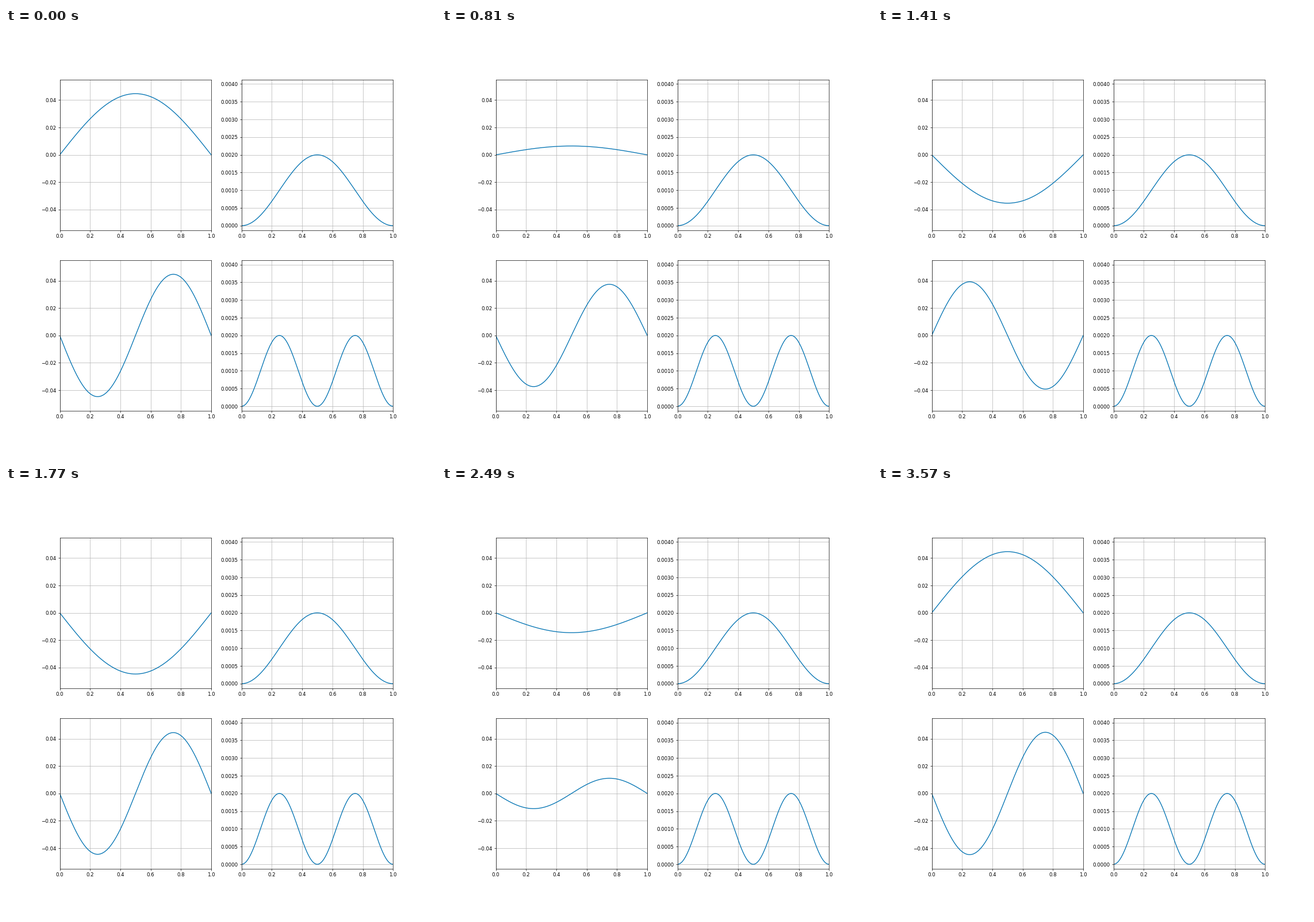
Recreate the animation shown at these times as a matplotlib script. Size 748 by 748 pixels, loop 3600 ms.

```python
import numpy as np
import matplotlib.pyplot as plt
from matplotlib.animation import FuncAnimation

SIZE = 748
INCHES = 12
FRAMES = 120
INTERVAL = 30
POINTS = 1000
LINE_COLOR = "#0072B2"

plt.rcParams["font.family"] = "DejaVu Sans"

x = np.linspace(0, 1, POINTS)
times = np.linspace(0, 2 * np.pi, FRAMES)
amplitude = np.sqrt(2 / POINTS)

# The two lowest states of a particle in a box; energy grows as n squared.
states = [
    (1, amplitude * np.sin(np.pi * x)),
    (4, -amplitude * np.sin(2 * np.pi * x)),
]


def setup(ax, ylim):
    ax.set_xlim(0, 1)
    ax.set_ylim(*ylim)
    ax.grid(True)


fig, axes = plt.subplots(2, 2, figsize=(INCHES, INCHES), dpi=SIZE / INCHES)
fig.subplots_adjust(left=0.125, right=0.9, bottom=0.11, top=0.88,
                    wspace=0.2, hspace=0.2)

waves = []
for (wave_ax, density_ax), (_, psi) in zip(axes, states):
    setup(wave_ax, (-0.055, 0.055))
    setup(density_ax, (-0.000125, 0.004125))
    waves += wave_ax.plot(x, psi, color=LINE_COLOR)
    density_ax.plot(x, psi ** 2, color=LINE_COLOR)


def update(frame):
    for wave, (energy, psi) in zip(waves, states):
        wave.set_ydata(psi * np.cos(energy * times[frame]))
    return waves


anim = FuncAnimation(fig, update, frames=FRAMES, interval=INTERVAL,
                     repeat=True, repeat_delay=0, blit=False)
plt.show()
```
